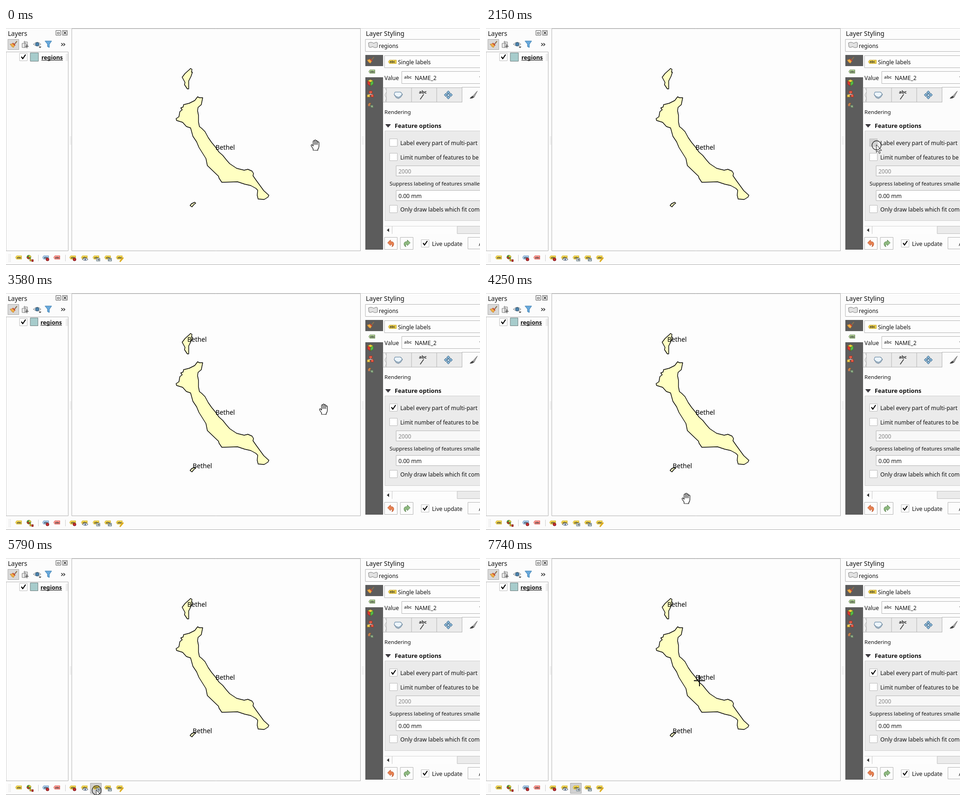
Animation of 1017x510 px, one loop 8 s. Source, as an HTML page with a canvas:

```html
<!DOCTYPE html>
<html lang="en">
<head>
<meta charset="utf-8">
<title>Label every part</title>
<style>
html, body { margin: 0; width: 100%; height: 100%; overflow: hidden; background: #fcfcfc; }
canvas { display: block; }
</style>
</head>
<body>
<canvas id="stage" width="1017" height="510"></canvas>
<script>
const c = document.getElementById('stage').getContext('2d');
const LOOP = 8000;
const FONT = '"Noto Sans", "Open Sans", sans-serif';

const ISLAND = 'M411 148L415 150 422 150 419 165 412 171 411 178 413 188 413 202 415 212 420 216 427 223 434 236 441 246 450 257 457 267 465 274 473 284 480 292 495 302 511 306 519 304 528 308 531 313 530 318 537 328 553 350 564 360 562 364 554 369 541 368 539 360 540 349 536 345 525 339 512 336 497 331 463 332 457 323 456 319 432 296 429 281 414 257 409 245 401 233 396 215 387 212 379 203 366 199 365 195 371 191 373 180 378 176 375 172 380 170 381 165 393 162 405 156Z';
const ISLET_NORTH = 'M396 87L399 89 398 95 400 95 397 104 392 114 392 131 389 131 383 122 384 117 378 106 384 98 393 90Z';
const ISLET_SOUTH = 'M395 382L398 378 405 375 407 377 403 380 399 385Z';

const HAND = new Path2D('M5 23V20L1 14Q0 11 2.5 11L5 14V4Q5 2.5 6.5 2.5T8 4V2Q8 .7 9.5 .7T11 2V3.5Q11 2.3 12.5 2.3T14 3.5V6Q14 4.8 15.7 4.8T17.5 6V15Q17 19 15 21V23.3ZM8 4V11M11 3V11M14 5V11');
const ARROW = new Path2D('M.5 .5V16.5L4 13.2 6.5 19 9 18 6.6 12.3H11.5Z');
const SPLIT = new Path2D('M9.5 0V19M13.5 0V19M8 9.5H1M15 9.5H22M4.5 6L1 9.5 4.5 13M18.5 6L22 9.5 18.5 13');
const CROSS = new Path2D('M0 12H24M12 0V24');

// time, cursor, left, top
const MOVES = [
  [0, 'hand', 654, 240], [500, 'hand', 677, 232], [640, 'hand', 703, 234], [760, 'hand', 727, 237],
  [910, 'arrow', 768, 249], [1050, 'arrow', 787, 250], [1180, 'arrow', 802, 251], [1320, 'arrow', 817, 251],
  [1460, 'arrow', 823, 251], [1580, 'arrow', 827, 251], [1740, 'arrow', 837, 251],
  [3160, 'split', 756, 240], [3310, 'hand', 717, 235], [3450, 'hand', 695, 236], [3580, 'hand', 672, 238],
  [3710, 'hand', 671, 244], [3830, 'hand', 595, 297], [3980, 'hand', 497, 429], [4250, 'hand', 420, 430],
  [4370, 'hand', 340, 430], [4490, 'hand', 275, 431], [4610, 'hand', 237, 432], [4730, 'hand', 217, 437],
  [4850, 'hand', 207, 462], [4990, 'arrow', 212, 489], [5120, 'arrow', 200, 496], [5240, 'arrow', 193, 499],
  [6500, 'cross', 225, 428], [6620, 'cross', 345, 368], [6740, 'cross', 425, 308], [6860, 'cross', 435, 263],
  [7010, 'cross', 445, 257], [7300, 'cross', 446, 254], [7440, 'cross', 446, 253], [7740, 'cross', 446, 252]
];

function fill(x, y, w, h, color) {
  c.fillStyle = color;
  c.fillRect(x, y, w, h);
}

function box(x, y, w, h, color, edge = '#b4b4b4') {
  fill(x, y, w, h, color);
  c.strokeStyle = edge;
  c.lineWidth = 1;
  c.strokeRect(x + .5, y + .5, w - 1, h - 1);
}

function text(str, x, y, size = 12, color = '#111', weight = 400) {
  c.font = `${weight} ${size}px ${FONT}`;
  c.fillStyle = color;
  c.fillText(str, x, y);
}

function shape(d, color, edge, width = 1) {
  const path = typeof d === 'string' ? new Path2D(d) : d;
  c.lineWidth = width;
  c.lineJoin = c.lineCap = 'round';
  if (color) { c.fillStyle = color; c.fill(path); }
  if (edge) { c.strokeStyle = edge; c.stroke(path); }
}

function at(x, y, draw) {
  c.save();
  c.translate(x, y);
  draw();
  c.restore();
}

function dot(x, y, r, color, edge) {
  c.beginPath();
  c.arc(x, y, r, 0, 7);
  if (color) { c.fillStyle = color; c.fill(); }
  if (edge) { c.strokeStyle = edge; c.lineWidth = 1.2; c.stroke(); }
}

function check(x, y, on, color = '#fff', edge = '#bcbcbc') {
  box(x, y, 17, 17, color, edge);
  if (on) at(x, y, () => shape('M4.5 8.5L7 12 12.5 4', null, '#000', 2.2));
}

function tag(x, y, color = '#f5d84c', edge = '#cfae35', w = 13) {
  at(x - w / 2, y - 4.5, () => {
    shape(`M0 4L2.5 .5H${w}V8H2.5Z`, color, edge, .8);
    text('abc', 2.4, 6.6, w > 15 ? 7 : 5.8, '#333', 700);
  });
}

function dots(x, y, rows, color = '#b8b8b8') {
  for (let i = 0; i < rows; i++) fill(x, y + i * 3, 1, 1, color);
}

function brush(x, y) {
  at(x, y, () => {
    shape('M2 -1L7 -7', null, '#8f6f4a', 2);
    shape('M-7 -1L-1 -3 3 1 0 6Q-4 5 -7 -1Z', '#eeb04a', '#b9772d', .8);
    shape('M-1 -3L3 1', null, '#c9412c', 2.2);
  });
}

function drawLayers(t) {
  text('Layers', 4, 17, 13.6);
  for (const x of [107, 121]) box(x, 5, 11, 11, '#fcfcfc', '#555');
  box(110, 9, 5, 4, '#fff', '#444');
  shape('M124 8L129 13M129 8L124 13', null, '#333', 1.5);

  box(4, 24, 24, 23, '#d9d9d9', '#ababab');
  brush(16, 36);
  at(41, 35, () => {
    shape('M-6 -2H2V7H-6ZM-3 -5H5V4M-1 -7V7', '#ececec', '#777');
    shape('M4 1V8M1 4.5H7', null, '#555', 1.5);
  });
  at(67, 35, () => {
    shape('M-8 0Q0 -9 8 0Q0 8 -8 0Z', '#e9f2f7', '#777');
    dot(0, 0, 3.7, '#4c83ad', '#345f80');
    shape('M3 5H9L6 8Z', '#333');
  });
  shape('M84 28H98L93 35V42L89 40V35Z', '#69a9dc', '#397cae');
  shape('M119 33L122 35.5 119 38M123.5 33L126.5 35.5 123.5 38', null, '#111', 1.4);

  box(0, 51, 134, 429, '#fdfdfd');
  fill(128, 55, 5, 16, '#eee');
  check(29, 54, true);
  const refreshed = t >= 2450;
  const nameX = refreshed ? 74 : 76;
  box(52, 53, refreshed ? 17 : 18, refreshed ? 18 : 19, '#a7cccc', '#707f7f');
  text('regions', nameX, 68, 12.3, '#111', 700);
  fill(nameX, 69, 46, 1, '#111');
}

function drawMap(t) {
  box(141, 1, 620, 479, '#fdfdfd', '#b2b2b2');
  for (const d of [ISLAND, ISLET_NORTH, ISLET_SOUTH]) shape(d, '#ffffc2', '#000', 1.4);
  text('Bethel', 449.5, 262, 13.8, '#000');
  if (t >= 2580) {
    text('Bethel', 389, 105, 13.8, '#000');
    text('Bethel', 400.5, 377, 13.8, '#000');
  }
  for (const x of [137, 139, 764, 766]) dots(x, 234, 6, '#c8c8c8');
}

function drawSidebar() {
  fill(771, 58, 38, 419, '#5c5c5c');
  fill(771, 82, 38, 24, '#fcfcfc');
  brush(782, 70);
  tag(785, 94, '#a9c991', '#66814f');
  at(782, 118, () => {
    shape('M0 -7L6 -4 0 -1 -6 -4Z', '#f0d33d', '#8c751f', .7);
    shape('M-6 -4L0 -1V7L-6 3Z', '#dc3d30', '#832019', .7);
    shape('M6 -4L0 -1V7L6 3Z', '#58b947', '#2f6b26', .7);
  });
  at(782, 142, () => {
    box(-3, -7, 7, 6, '#e5604b', '#a92d1d');
    box(-7, 1, 6, 6, '#f0cf57', '#ab8526');
    box(1, 1, 6, 6, '#e5604b', '#a92d1d');
    shape('M0 -1V1M-4 1H4', null, '#ddd');
  });
  at(782, 166, () => {
    shape('M-5 -1Q-4 -6 1 -4L-1 -1', '#d79848', '#9b5a32');
    shape('M0 1L5 0 6 5 2 5Z', '#93b08c', '#5e7d58');
    dot(-3, 0, 2.4, '#c27a4c');
  });
}

function drawTabs() {
  box(809, 128, 8, 32, '#f2f2f2');
  shape('M814 130L817 136 813 144 816 151 814 158', '#fcfcfc', '#aaa');
  for (const x of [816, 870, 924]) box(x, 128, 55, 32, '#ebebeb');
  fill(978, 127, 39, 33, '#fcfcfc');
  fill(978, 127, 1, 33, '#b4b4b4');
  fill(978, 127, 39, 1, '#b4b4b4');
  at(842, 144, () => {
    shape('M-7 -6H5L9 -1 5 5 0 8 -5 6 -9 0Z', '#a8b8c6', '#71879b');
    shape('M-7 -6H4L8 -2 4 3 0 5 -5 3 -9 -1Z', '#edf5fb', '#6d8fab');
  });
  text('abc', 886, 141, 9.5, '#222', 700);
  shape('M889 153L896 143', null, '#333', 1.5);
  at(949, 144, () => {
    for (let i = 0; i < 4; i++) {
      c.rotate(Math.PI / 2);
      shape('M-2 -3V-5H-4L0 -9 4 -5H2V-3Z', '#87b4d4', '#3e6d91');
    }
    box(-2, -2, 5, 5, '#d8e7f1', '#4d7898');
  });
  shape('M1011 136L1001 147 1004 149Z', '#aaa', '#666');
  shape('M1001 146Q997 148 995 152Q1002 152 1004 149Z', '#444');
}

function drawStyling(t) {
  text('Layer Styling', 772, 17, 13.8);
  box(771, 24, 260, 27, '#fdfdfd');
  shape('M778 32Q784 29 789 33Q795 29 797 32V41Q791 44 787 40Q781 43 779 41Z', '#e2e2e2', '#777');
  text('regions', 800, 43, 11.8);
  drawSidebar();

  box(812, 59, 220, 27, '#fdfdfd');
  tag(829, 73, '#f5d84c', '#b9971d', 17);
  text('Single labels', 841, 78);
  text('Value', 812, 112);
  box(849, 93, 180, 27, '#fdfdfd');
  text('abc', 854, 109, 9.5, '#555', 700);
  text('NAME_2', 877, 112);
  fill(1016, 104, 1, 2, '#777');
  drawTabs();

  text('Rendering', 812, 185, 11.6);
  shape('M815 207.5H825L820 213.5Z', '#403c46', '#222');
  text('Feature options', 834, 215, 12.7, '#111', 700);

  box(813, 221, 230, 194, '#ebebeb', '#cecece');
  const pressed = t >= 2150 && t < 2300;
  check(823, 238, t >= 2300, pressed ? '#d2d2d2' : '#fff');
  check(823, 269, false);
  check(823, 381, false);
  text('Label every part of multi-part', 846, 252, 12.1);
  text('Limit number of features to be', 846, 283, 11.7);
  box(837, 296, 200, 23, '#f8f8f8');
  text('2000', 842, 313, 12, '#858585');
  text('Suppress labeling of features smaller', 823, 339, 11.4);
  box(837, 349, 200, 23, '#fff');
  text('0.00 mm', 842, 366, 12.1);
  text('Only draw labels which fit completely', 846, 395, 11.9);

  fill(812, 426, 205, 17, '#fdfdfd');
  fill(812, 426, 205, 1, '#d8d8d8');
  fill(828, 426, 1, 17, '#c8c8c8');
  box(968, 426, 60, 17, '#ebebeb', '#c0c0c0');
  shape('M822 431V439L817 435Z', '#333');

  for (const x of [812, 846]) box(x, 450, 28, 27, '#fcfcfc');
  const back = 'M-7 -1L-1 -7V-3Q6 -4 6 2Q6 6 2 8Q4 2 -1 2V5Z';
  at(826, 463, () => shape(back, '#e98352', '#b9522c'));
  at(860, 463, () => { c.scale(-1, 1); shape(back, '#91bd82', '#557f4b'); });
  check(891, 455, true);
  text('Live update', 914, 469);
  box(991, 450, 60, 26, '#fcfcfc');
  text('Apply', 1014.5, 469);
}

function drawToolbar(t) {
  for (const x of [6, 9]) dots(x, 487, 6);
  for (const x of [69, 127]) fill(x, 488, 1, 14, '#cfcfcf');

  if (t >= 4990 && t < 5120) box(206, 484, 24, 23, '#ededed', '#c4c4c4');
  if (t >= 5120 && t < 5790) box(181, 484, 24, 23, '#ededed', '#c4c4c4');
  if (t >= 5790) box(181, 484, 24, 23, '#d2d2d2', '#a5a5a5');

  tag(27, 494);
  at(51, 495, () => {
    dot(-2, -2, 4, '#4eaa3d', '#37752c');
    shape('M-2 -2V-6Q3 -6 3 -2Z', '#e5d23f', '#87791e', .6);
    shape('M-2 -2H-6Q-6 2 -2 2Z', '#d33b2e', '#842019', .6);
    box(0, 1, 3, 6, '#e4bd38', '#9f7c16');
    box(4, 3, 4, 5, '#c73428', '#7d1b13');
  });
  tag(85, 494, '#a8cdf0', '#6a91b5');
  dot(89, 498, 3, '#c92c30', '#84191c');
  tag(109, 494, '#ff9991', '#d84943');
  for (const x of [143, 168, 193, 218, 243]) tag(x, 494);
  dot(147, 498, 3, '#c92c30', '#84191c');
  shape('M164 498Q170 492 176 498Q170 503 164 498Z', '#e8edf4', '#56657a');
  dot(170, 498, 1.5, '#364e77');
  box(194, 495, 8, 7, '#dce6ea', '#627680');
  shape('M196 498.5H200M198.5 497L200 498.5 198.5 500', null, '#333');
  box(219, 495, 8, 7, '#cbdbdf', '#627680');
  shape('M221 500Q220 496 224 497L225 499', null, '#333');
  shape('M245 502L251 495', null, '#e0ac1d', 3);
  fill(0, 509, 1017, 1, '#aaa');
}

function drawCursor(t) {
  const [, kind, x, y] = MOVES.findLast(move => move[0] <= t);
  at(x, y, () => {
    if (kind === 'hand') shape(HAND, '#fff', '#000', 1.15);
    if (kind === 'arrow') shape(ARROW, '#fff', '#222', 1);
    if (kind === 'split') {
      shape(SPLIT, null, '#fff', 3);
      shape(SPLIT, null, '#000', 1.1);
    }
    if (kind === 'cross') {
      c.lineCap = 'butt';
      c.lineWidth = 2;
      c.strokeStyle = '#111';
      c.stroke(CROSS);
    }
  });
  if (t >= 2150 && t < 2300) dot(838, 252.5, 9.8, null, '#111');
  if (t >= 5790 && t < 5940) dot(194.5, 500, 9.8, null, '#111');
}

function render(now) {
  const t = now % LOOP;
  fill(0, 0, 1017, 510, '#fcfcfc');
  fill(0, 0, 1017, 1, '#d4d4d4');
  drawLayers(t);
  drawMap(t);
  drawStyling(t);
  drawToolbar(t);
  drawCursor(t);
}

const start = performance.now();
function tick() {
  render(performance.now() - start);
  requestAnimationFrame(tick);
}
tick();
</script>
</body>
</html>
```
